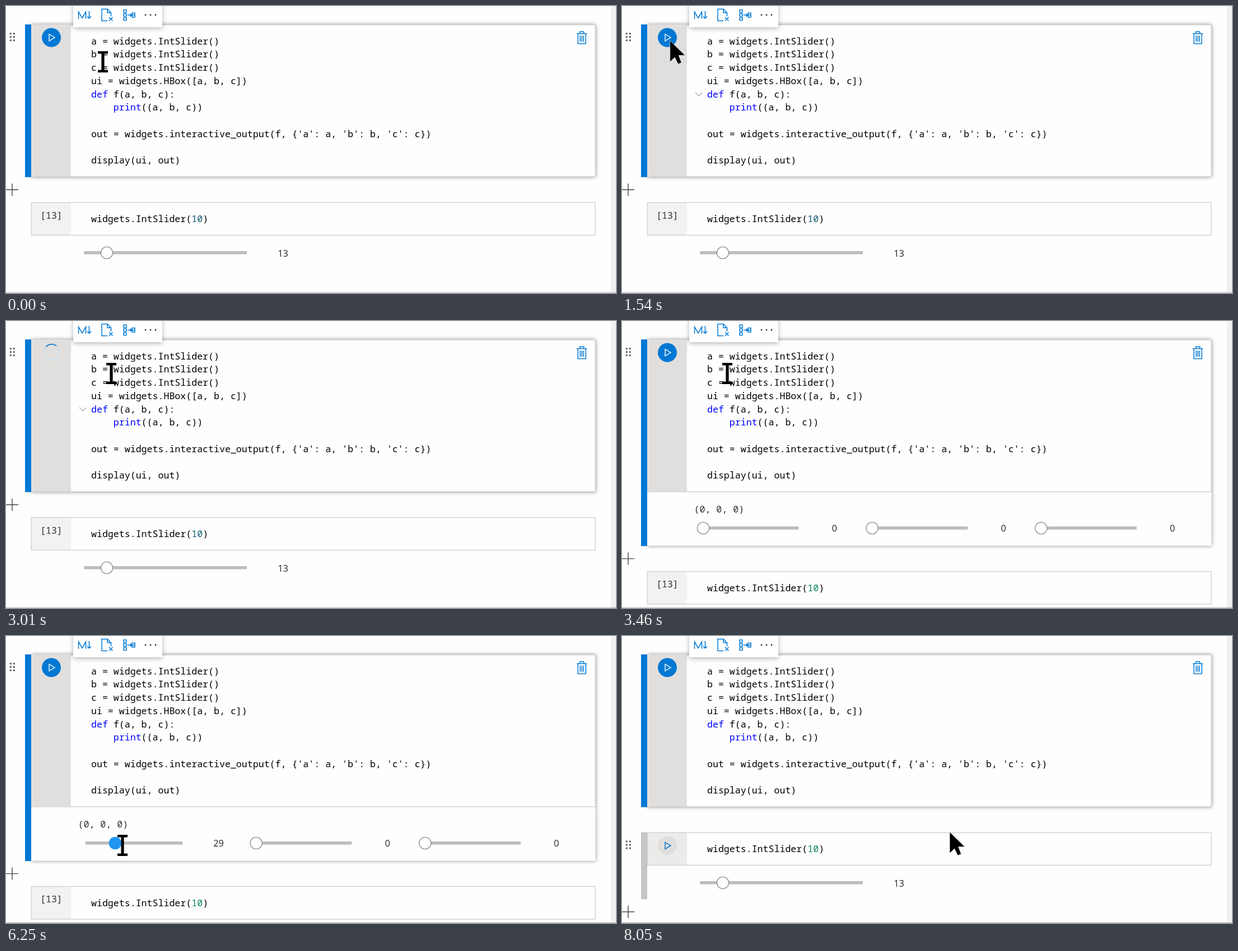
An HTML page that plays this animation: 1089x514 px, repeating every 9.74 s.

```html
<!DOCTYPE html>
<html lang="en">
<head>
<meta charset="utf-8">
<title>Notebook sliders</title>
<style>
  html, body { margin: 0; width: 100%; height: 100%; overflow: hidden; background: #fefefe; }
  svg { display: block; }
  text { white-space: pre; }
  .mono { font: 16.6px "Noto Sans Mono", "DejaVu Sans Mono", monospace; fill: #000; }
  .ui { font: 16.2px "Open Sans", "Noto Sans", sans-serif; fill: #222; text-anchor: middle; }
  .key { fill: #00f; }
  .soft { fill: #323130; }
  .line { fill: none; stroke: #0078d4; stroke-width: 1.5; }
  .rule { fill: none; stroke: #d2d2d2; stroke-width: 1.4; }
  .knob { fill: #fff; stroke: #949494; stroke-width: 1.4; }
  .knob.on { fill: #2196f3; stroke: #2196f3; }
  .track { fill: #bdbdbd; }
  .raised { filter: drop-shadow(0 0 3.5px rgba(0, 0, 0, .48)); }
  .menu { filter: drop-shadow(0 2px 4px rgba(0, 0, 0, .3)); }
</style>
</head>
<body>
<svg width="1089" height="514" viewBox="0 0 1089 514">
  <rect width="1089" height="514" fill="#fefefe"/>

  <!-- active cell -->
  <rect id="card" class="raised" x="45" y="33.5" width="1007.5" height="272.5" fill="#fefefe"/>
  <rect id="bar" x="34" y="33" width="11" height="273.5" fill="#0078d4"/>
  <rect x="45" y="33.5" width="71" height="272" fill="#e1dfdd"/>
  <path class="rule" d="M45 305.7H1052V33.7H116"/>
  <g id="code"></g>
  <path id="fold" d="M131 155l6 6 6-6" fill="none" stroke="#777"/>
  <g id="run">
    <circle cx="81" cy="56.5" r="17" fill="#0078d4"/>
    <path d="M77 50.5V62.5L87 56.5Z" fill="none" stroke="#fff" stroke-width="1.4"/>
  </g>
  <g id="spin" fill="none" stroke-width="1.7">
    <circle cx="81.5" cy="55" r="13.5" stroke="#c7e0f4"/>
    <path id="arc" d="M95 55A13.5 13.5 0 0 1 81.5 68.5" stroke="#0078d4"/>
  </g>
  <path class="line" d="M1019 49.5H1037M1024.5 49V46H1031.5V49M1021 50V67.5H1035V50M1025 53V64M1028 53V64M1031 53V64"/>

  <!-- output of the active cell -->
  <g id="out">
    <text class="mono soft" x="128.5" y="342.5">(0, 0, 0)</text>
    <g id="sliders"></g>
  </g>

  <!-- second cell -->
  <g id="below">
    <rect x="45" y="352" width="71" height="58.5" fill="#f3f2f1" id="gutter"/>
    <rect class="rule" x="45.3" y="352" width="1006.7" height="58.5"/>
    <text id="label" class="mono soft" x="61" y="380.5">[13]</text>
    <g id="hover">
      <rect x="34" y="351.5" width="11" height="120" fill="#c8c6c4"/>
      <circle cx="81" cy="375.5" r="17" fill="#e1dfdd"/>
      <path class="line" d="M77 369.5V381.5L87 375.5Z" stroke-width="1.3"/>
    </g>
    <text class="mono" x="152" y="387">widgets.IntSlider(<tspan id="num">10</tspan>)</text>
    <rect class="track" x="139" y="439" width="291" height="5.6"/>
    <circle class="knob" cx="180" cy="442" r="10.6"/>
    <text class="ui" x="494.5" y="448.8">13</text>
  </g>

  <path id="plus" d="M0 0H22M11-11V11" fill="none" stroke="#444" stroke-width="1.4"/>
  <g id="grip" fill="#605e5c"></g>

  <!-- toolbar -->
  <rect class="menu" x="120" y="-6" width="159" height="44" fill="#fff"/>
  <path class="line" d="M129.5 23V10.5L136 21.5L142.5 10.5V23M148.5 9V22M145 18.5L148.5 22L152 18.5"/>
  <path class="line" d="M181 26.5H171V5.5H181L187.5 12V18.5M181 5.5V12H187.5M184 20L190.5 26.5M190.5 20L184 26.5"/>
  <path class="line" stroke-width="1.3" d="M210 7H215V11.5H210ZM210 14H215V18.5H210ZM210 21H215V25.5H210ZM217 16.2H224M221.5 13.5L224.3 16.2L221.5 19M225 12.5H230V20H225ZM225 16.2H230"/>
  <g fill="#333"><circle cx="249" cy="16" r="1.4"/><circle cx="258" cy="16" r="1.4"/><circle cx="267" cy="16" r="1.4"/></g>

  <!-- window edges -->
  <rect x="1080" width="9" height="513" fill="#f0f0f0"/>
  <rect y="512.7" width="1089" height="1.3" fill="#c4c4c4"/>

  <path id="beam" d="M-9-19H9V-14.5H2.6V14.5H9V19H-9V14.5H-2.6V-14.5H-9Z"/>
  <path id="arrow" d="M0 0V38L8.5 30L14.5 42L20.5 39.5L15.5 26.5H27Z" stroke="#fff" stroke-width=".6"/>
</svg>
<script>
const $ = id => document.getElementById(id);
const show = (id, on) => $(id).setAttribute('visibility', on ? 'visible' : 'hidden');
const move = (id, x, y) => $(id).setAttribute('transform', `translate(${x} ${y})`);
const range = n => [...Array(n).keys()];

const source = `a = widgets.IntSlider()
b = widgets.IntSlider()
c = widgets.IntSlider()
ui = widgets.HBox([a, b, c])
def f(a, b, c):
    print((a, b, c))

out = widgets.interactive_output(f, {'a': a, 'b': b, 'c': c})

display(ui, out)`;
$('code').innerHTML = source.split('\n').map((row, i) =>
  `<text class="mono" x="152" y="${68.7 + i * 23.75}">${
    row.replace(/\b(def|print)\b/, '<tspan class="key">$1</tspan>')}</text>`).join('');

$('sliders').innerHTML = range(3).map(i => {
  const x = i * 301.6;
  return `<rect class="track" x="${x + 142}" y="368" width="173.5" height="5.6"/>
    <circle class="knob" cx="${x + 145}" cy="371" r="10.6"/>
    <text class="ui" x="${x + 379.5}" y="377.3">0</text>`;
}).join('');
const knob = document.querySelector('#sliders .knob');
const value = document.querySelector('#sliders text');

$('grip').innerHTML = range(6).map(i =>
  `<circle cx="${8.3 + i % 2 * 6}" cy="${Math.floor(i / 2) * 6 - 6}" r="1.7"/>`).join('');

const LOOP = 9740, TICK = 77.4, LEAD = 30;

// Pointer path: tick, x, y, shape from here on
const path = [
  [0, 173, 100, 'beam'], [3, 250, 92, 'beam'], [6, 400, 118, 'beam'],
  [7, 469, 144, 'beam'], [10, 340, 132, 'beam'], [13, 194, 116, 'beam'],
  [16, 142, 88, 'arrow'], [19, 86, 62, 'arrow'], [26, 84, 62, 'arrow'],
  [28, 143, 82, 'arrow'], [30, 168, 92, 'beam'], [39, 188, 94, 'beam'],
  [52, 188, 94, 'beam'], [55, 182, 190, 'beam'], [58, 162, 320, 'arrow'],
  [61, 147, 360, 'arrow'], [62, 147, 360, 'arrow'], [64, 148, 374, 'arrow'],
  [65, 148, 374, 'arrow'], [68, 180, 376, 'beam'], [71, 213, 376, 'beam'],
  [72, 213, 376, 'beam'], [78, 208, 375, 'beam'], [83, 208, 375, 'beam'],
  [85, 190, 330, 'arrow'], [88, 180, 200, 'beam'], [91, 240, 70, 'beam'],
  [94, 420, 200, 'beam'], [96, 454, 275, 'beam'], [98, 490, 335, 'arrow'],
  [101, 577, 344, 'arrow'], [102, 577, 344, 'arrow'], [104, 585, 351, 'arrow']
];

function pointer(k) {
  const i = path.findLastIndex(p => p[0] <= k);
  const a = path[i], b = path[i + 1] || a;
  const u = a === b ? 0 : (k - a[0]) / (b[0] - a[0]);
  return { x: a[1] + (b[1] - a[1]) * u, y: a[2] + (b[2] - a[2]) * u, shape: a[3] };
}

function draw(k) {
  const open = k >= 44 && k < 82;
  const busy = k >= 25 && k < 40;
  const lower = k >= 82 && k < 85 || k >= 98;
  const shift = open ? 96.6 : 0;

  $('card').setAttribute('height', 272.5 + shift);
  $('bar').setAttribute('height', 273.5 + shift);
  move('below', 0, shift);
  move('plus', 0, lower ? 494 : 329 + shift);
  move('grip', 0, lower ? 374 : 55.5);
  show('out', open);
  show('run', !busy);
  show('spin', busy);
  show('fold', k >= 16 && k < 40);
  show('hover', lower);
  show('label', !lower);
  $('gutter').setAttribute('fill', lower ? '#edebe9' : '#f3f2f1');
  $('num').setAttribute('fill', k < 44 ? '#0f5a72' : '#098658');
  $('arc').setAttribute('transform', `rotate(${(k - 28) * 21.4 - 15} 81.5 55)`);

  const n = Math.round(29 * Math.min(1, Math.max(0, (k - 72) / 6)));
  knob.setAttribute('cx', 145 + n * 1.72);
  knob.classList.toggle('on', k >= 66);
  value.textContent = n;

  const p = pointer(k);
  move(p.shape, p.x, p.y);
  show('beam', p.shape === 'beam');
  show('arrow', p.shape === 'arrow');
}

let last = -1;
function tick() {
  const k = Math.floor((performance.now() % LOOP + LEAD) / TICK);
  if (k !== last) draw(last = k);
  requestAnimationFrame(tick);
}
tick();
</script>
</body>
</html>
```
